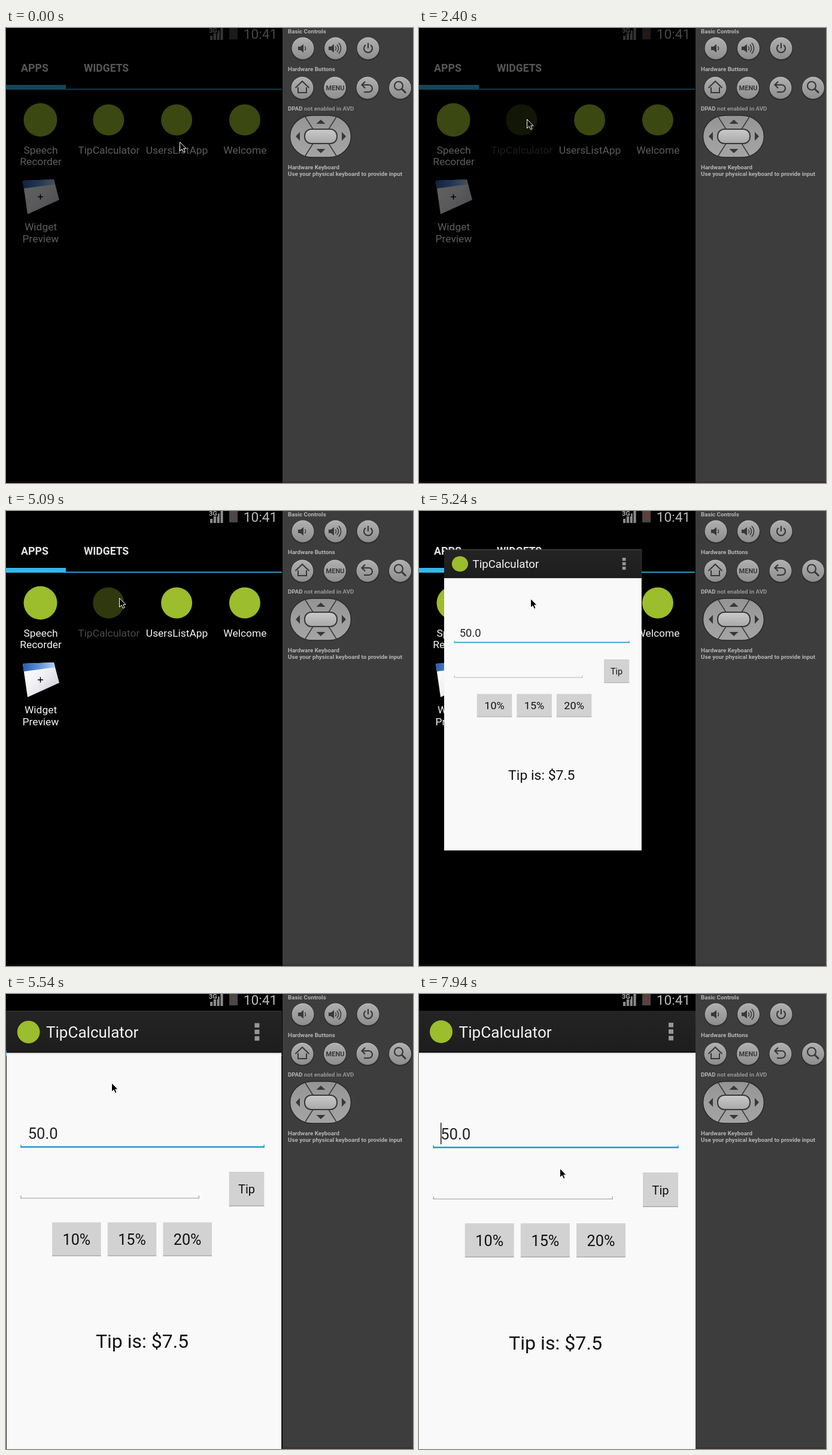
Write an HTML page with a canvas that moves like this. It is 680 px wide and 760 px high and loops after 8000 ms.

```html
<!DOCTYPE html>
<html lang="en">
<head>
<meta charset="utf-8">
<title>Emulator</title>
<style>
html, body { margin: 0; width: 100%; height: 100%; overflow: hidden; background: #000; }
canvas { display: block; width: 680px; height: 760px; }
</style>
</head>
<body>
<canvas id="stage" width="680" height="760"></canvas>
<script>
const c = document.getElementById('stage').getContext('2d');
const LOOP = 8000, STEP = 150, RESYNC = 4040;
const PRESS = 2400, WAKE = 3000, OPEN = 5240, ZOOM = 350, FOCUS = 5690;
const FONT = 'Roboto, "Noto Sans", sans-serif';
const GREEN = '#9cbd2c', INK = '#383838';

// Pointer moves: start, end, x, y
const home = [290, 190];
const moves = [
  [0, 600, 227, 176], [600, 1050, 284, 161], [1050, 1650, 179, 151],
  [1800, 1950, 180, 152], [3450, 4040, 215, 141], [4490, 5090, 189, 145],
  [5090, 5540, 176, 148], [5540, 5990, 190, 154], [6440, 6740, 188, 157],
  [6890, 7490, 205, 305], [7640, 7940, 235, 291]
];

const ease = u => u * u * (3 - 2 * u);
const clamp = u => Math.max(0, Math.min(1, u));

// The screen refreshes in fixed steps
function refresh(t) {
  const base = t < RESYNC ? 0 : RESYNC;
  return base + Math.floor((t - base) / STEP) * STEP;
}

function pointerAt(t) {
  return moves.reduce(([px, py], [a, b, x, y]) => {
    const u = ease(clamp((t - a) / (b - a)));
    return [px + (x - px) * u, py + (y - py) * u];
  }, home);
}

function rect(x, y, w, h, fill) {
  c.fillStyle = fill;
  c.fillRect(x, y, w, h);
}

function disc(x, y, r, fill) {
  c.fillStyle = fill;
  c.beginPath();
  c.arc(x, y, r, 0, Math.PI * 2);
  c.fill();
}

function path(pts, close) {
  c.beginPath();
  pts.forEach(([x, y]) => c.lineTo(x, y));
  if (close) c.closePath();
}

function poly(pts, fill) {
  path(pts, true);
  c.fillStyle = fill;
  c.fill();
}

function stroke(color, width) {
  c.strokeStyle = color;
  c.lineWidth = width;
  c.stroke();
}

function line(pts, color, width) {
  path(pts);
  stroke(color, width);
}

function arc(x, y, r, a, b, width = 2.2) {
  c.beginPath();
  c.arc(x, y, r, a, b);
  stroke(INK, width);
}

function text(s, x, y, size, fill, align = 'left', weight = 400) {
  c.font = `${weight} ${size}px ${FONT}`;
  c.textAlign = align;
  c.fillStyle = fill;
  c.fillText(s, x, y);
}

function shade(x0, y0, x1, y1, ...colors) {
  const g = c.createLinearGradient(x0, y0, x1, y1);
  colors.forEach((col, i) => g.addColorStop(i / (colors.length - 1), col));
  return g;
}

function statusBar() {
  rect(0, 0, 462, 27, '#000');
  for (let i = 0; i < 4; i++) {
    const h = 7 + i * 4.4;
    rect(341 + i * 5.8, 20 - h, 4.2, h, '#8a8a8a');
  }
  rect(338, 0, 16, 9, '#000');
  text('3G', 339, 7.5, 11, '#aaa', 'left', 700);
  rect(373, 0, 14, 19, '#484848');
  rect(379, 3, 2, 8, '#b5240e');
  rect(379, 13, 2, 2, '#b5240e');
  text('10:41', 425, 18, 22.7, '#bcbcbc', 'center');
}

function label(s, x, y) {
  s.split(' ').forEach((word, i) => text(word, x, y + i * 19.5, 17.4, '#f4f4f4', 'center'));
}

function widgetIcon() {
  poly([[28, 255], [80, 253], [89, 287], [36, 311]], shade(30, 260, 80, 305, '#fff', '#f0f0f4', '#d0d0d8'));
  poly([[28, 255], [80, 253], [82, 261], [30, 268]], shade(28, 0, 82, 0, '#2b5ca8', '#5b92dc', '#b5d0f2'));
  line([[53, 282], [62, 282]], '#000', 1.5);
  line([[57.5, 277.5], [57.5, 286.5]], '#000', 1.5);
}

function launcher(pressed) {
  rect(0, 0, 462, 760, '#000');
  rect(0, 757, 462, 3, '#0d060b');
  text('APPS', 48, 73, 17.8, '#e4e4e4', 'center', 700);
  text('WIDGETS', 167.5, 73, 17.5, '#e4e4e4', 'center', 700);
  rect(0, 95, 100, 8, '#33b8ea');
  rect(100, 101.3, 361, 2, '#2ba2d0');

  ['Speech Recorder', 'TipCalculator', 'UsersListApp', 'Welcome'].forEach((name, i) => {
    const x = 57.5 + i * 113.8;
    c.globalAlpha = pressed && i === 1 ? .3 : 1;
    disc(x, 153.5, i ? 26 : 28, GREEN);
    label(name, x + .5, 209.6);
  });
  c.globalAlpha = 1;
  widgetIcon();
  label('Widget Preview', 58, 338);
}

function field(x0, x1, y, color, width) {
  for (const x of [x0 + .7, x1 - .7]) line([[x, y - 5], [x, y]], color, 1.4);
  rect(x0, y - width, x1 - x0, width, color);
}

function button(s, x, y, w, h, size, base) {
  rect(x, y, w, h, '#d2d2d2');
  rect(x, y + h - 1.5, w, 1.5, '#adadad');
  text(s, x + w / 2, base, size, '#111', 'center');
}

function app(t) {
  const left = clamp((OPEN + ZOOM - t) / ZOOM) ** 2;
  const blinkOn = Math.floor((t - OPEN - 250) / 500) % 2 === 0;
  c.save();
  c.beginPath();
  c.rect(0, 0, 462, 760);
  c.clip();
  c.transform(1 - .286 * left, 0, 0, 1 - .321 * left, 42 * left, 45.5 * left);
  rect(0, 28, 462, 740, '#f9f9f9');
  rect(0, 28, 462, 70, shade(0, 28, 0, 98, '#242424', '#1d1d1d'));
  rect(0, 96.5, 462, 1.5, '#0c0c0c');
  rect(0, 98, 462, 2, '#dedede');
  disc(37, 63, 19, GREEN);
  text('TipCalculator', 66.5, 72.5, 26.2, '#f3f3f3');
  for (let i = 0; i < 3; i++) rect(417, 48 + i * 11, 8, 7.5, '#979797');

  text('50.0', 36, 243, 25.8, '#222');
  field(23.5, 433.5, 257.5, '#1e9bcb', 2.5);
  field(23.5, 324, 343, '#aaa', 1.2);
  button('Tip', 374, 298, 59, 58, 20.2, 334.5);
  for (let i = 0; i < 3; i++) button(`${10 + i * 5}%`, 76.7 + i * 93.2, 383, 82, 57, 25.3, 420.5);
  text('Tip is: $7.5', 228, 594, 32.2, '#111', 'center');
  if (t >= FOCUS && blinkOn) rect(36, 215, 1.4, 36, '#111');
  c.restore();
}

function knob(x, y) {
  disc(x, y + 1, 19.5, '#2b2b2b');
  disc(x, y, 18.5, shade(0, y - 18, 0, y + 18, '#bdbdbd', '#858585'));
  disc(x, y, 17, shade(0, y - 17, 0, y + 17, '#aeaeae', '#8f8f8f'));
}

function speaker(x, y, waves) {
  poly([[x, y - 3], [x + 4, y - 3], [x + 9, y - 7], [x + 9, y + 7], [x + 4, y + 3], [x, y + 3]], INK);
  for (let i = 0; i < waves; i++) arc(x + 8, y, 4.5 + i * 4, -.8, .8, 1.6);
}

function dpad() {
  c.beginPath();
  c.roundRect(474.5, 146, 102, 70, [{ x: 37, y: 35 }]);
  c.fillStyle = shade(0, 146, 0, 216, '#949494', '#9e9e9e', '#a4a4a4');
  c.fill();
  stroke('#282828', 1.5);
  for (const sx of [-1, 1]) for (const sy of [-1, 1])
    line([[526 + sx * 27, 181 + sy * 34], [526 + sx * 13, 181 + sy * 12]], INK, 1.5);
  c.beginPath();
  c.roundRect(499, 169, 54, 24, 11);
  c.fillStyle = shade(0, 169, 0, 193, '#cacaca', '#a8a8a8');
  c.fill();
  stroke(INK, 2);
  for (const s of [-1, 1]) {
    poly([[518.5, 181 + s * 21], [533.5, 181 + s * 21], [526, 181 + s * 28]], INK);
    poly([[526 + s * 35, 173.5], [526 + s * 35, 188.5], [526 + s * 42, 181]], INK);
  }
}

function panel() {
  const title = (s, y, x = 471, fill = '#b5b5b5') => text(s, x, y, 9.75, fill, 'left', 700);
  rect(462, 0, 218, 760, '#3d3d3d');
  rect(462, 757, 218, 3, '#3a3237');
  title('Basic Controls', 8.5);
  title('Hardware Buttons', 72);
  title('DPAD', 137.5);
  title('not enabled in AVD', 137.5, 471 + c.measureText('DPAD ').width, '#969696');
  title('Hardware Keyboard', 236);
  title('Use your physical keyboard to provide input', 247);

  for (let i = 0; i < 3; i++) knob(496 + i * 54.5, 34);
  for (let i = 0; i < 4; i++) knob(495 + i * 54.5, 100);
  speaker(488, 34, 1);
  speaker(539, 34, 3);
  arc(605, 34, 7, -.95, Math.PI + .95);
  line([[605, 25], [605, 34]], INK, 2.2);

  line([[483.5, 100], [495, 89], [506.5, 100]], INK, 2);
  line([[488, 99], [488, 108], [502, 108], [502, 99]], INK, 2);
  text('MENU', 550, 104, 11, INK, 'center', 700);
  line([[600, 89.5], [594.5, 95], [600, 100.5]], INK, 2.2);
  line([[595, 95], [606, 95]], INK, 2.2);
  arc(606, 101, 6, -Math.PI / 2, Math.PI / 2);
  line([[606, 107], [598, 107]], INK, 2.2);
  arc(656, 96.5, 7, 0, Math.PI * 2);
  line([[661, 101.5], [668, 108.5]], INK, 3);
  dpad();
}

function pointer([x, y]) {
  c.save();
  c.translate(Math.round(x) + .5, Math.round(y) + .5);
  path([[0, 0], [0, 15], [3.5, 11.7], [6, 17], [8.5, 16], [6.2, 10.7], [10.5, 10.7]], true);
  c.fillStyle = '#000';
  c.fill();
  stroke('#fff', 1);
  c.restore();
}

function draw(t) {
  launcher(t >= PRESS);
  if (t >= OPEN) app(t);
  statusBar();
  if (t < WAKE) rect(0, 0, 462, 757, 'rgba(0,0,0,.62)');
  panel();
  pointer(pointerAt(t));
}

const begin = performance.now();
function tick() {
  draw(refresh((performance.now() - begin) % LOOP));
  requestAnimationFrame(tick);
}
tick();
</script>
</body>
</html>
```
